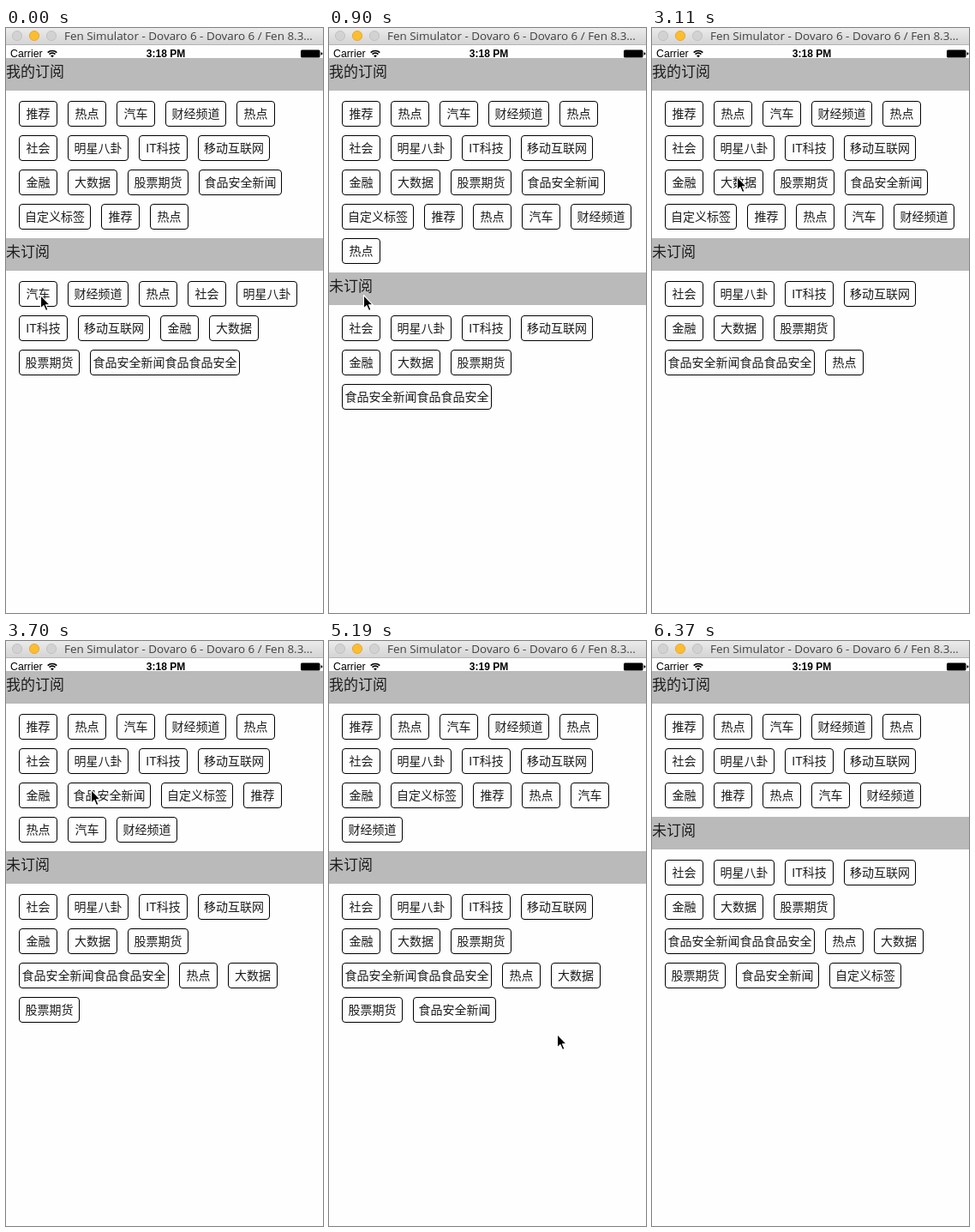
An HTML page that plays this animation: 370x682 px, repeating every 7250 ms.

```html
<!DOCTYPE html>
<html lang="zh-CN">
<head>
<meta charset="utf-8">
<title>订阅</title>
<style>
  html, body { margin: 0; width: 100%; height: 100%; overflow: hidden; background: #fefefe; }
  body { position: relative; color: #000; font-family: "Liberation Sans", "Noto Sans CJK SC", "Noto Sans CJK", sans-serif; }
  #bar, #pointer { position: absolute; left: 0; top: 0; }
  #pointer { overflow: visible; }
  main { position: absolute; left: 0; top: 35px; width: 370px; color: #1c1c1c; font-weight: 300; }
  h2 { margin: 0; height: 38px; background: #bababa; font: 300 17px/30px "Noto Sans CJK SC", "Noto Sans CJK", sans-serif; }
  .tags { display: flex; flex-wrap: wrap; gap: 10px 12px; padding: 12px 15px 10px; }
  .tags span { box-sizing: border-box; height: 30px; border: 1px solid #000; border-radius: 4px;
    font-size: 14px; line-height: 28px; text-align: center; white-space: nowrap; }
</style>
</head>
<body>
<svg id="bar" width="370" height="36">
  <defs>
    <linearGradient id="chrome" x2="0" y2="1">
      <stop stop-color="#ebebeb"/><stop offset="1" stop-color="#d3d3d3"/>
    </linearGradient>
  </defs>
  <rect width="370" height="20" fill="url(#chrome)"/>
  <rect y="19" width="370" height="1" fill="#b5b5b5"/>
  <g stroke-width=".8">
    <circle cx="13" cy="9" r="5.6" fill="#d2d2d2" stroke="#bcbcbc"/>
    <circle cx="33" cy="9" r="5.6" fill="#fdbd2f" stroke="#e0a029"/>
    <circle cx="53" cy="9" r="5.6" fill="#d2d2d2" stroke="#bcbcbc"/>
  </g>
  <text x="68" y="13.5" font-family="Open Sans, sans-serif" font-size="13.45" fill="#404040">Fen Simulator - Dovaro 6 - Dovaro 6 / Fen 8.3…</text>
  <text x="5" y="34" font-size="12.3">Carrier</text>
  <g fill="none" stroke="#000" stroke-width="1.7">
    <path d="M48.7 28.7a7.5 7.5 0 0 1 10.6 0M50.6 30.6a4.8 4.8 0 0 1 6.8 0"/>
    <path d="M54 34.3l-1.9-1.9a2.7 2.7 0 0 1 3.8 0z" fill="#000" stroke="none"/>
  </g>
  <text id="clock" x="186.5" y="34" font-size="12" font-weight="bold" text-anchor="middle"></text>
  <rect x="344" y="25.5" width="22.5" height="9" rx="1.5"/>
  <path d="M367.5 28.3q2 .3 2 1.7t-2 1.7z"/>
</svg>
<main>
  <h2>我的订阅</h2><div class="tags" id="mine"></div>
  <h2>未订阅</h2><div class="tags" id="others"></div>
</main>
<svg id="pointer" width="14" height="21">
  <path d="M.5 .5V16L4 12.7L6.6 18.6L9 17.5L6.5 11.8H11.3Z" stroke="#fff" stroke-width="1.1" stroke-linejoin="round"/>
</svg>
<script>
const $ = id => document.getElementById(id);
const LOOP = 7250, STEP = 147;
const base = '社会 明星八卦 IT科技 移动互联网 金融 大数据 股票期货';
const mineTags = `推荐 热点 汽车 财经频道 热点 ${base} 食品安全新闻 自定义标签 推荐 热点`.split(' ');
const otherTags = `汽车 财经频道 热点 ${base} 食品安全新闻食品食品安全`.split(' ');

const addTimes = [300, 600, 900];           // take the first of the others
const dropTimes = [3410, 3700, 4150, 6070]; // take the tag under the pointer
const dropLast = 2520, underPointer = 10;

// Curved pointer moves: start time, steps, bend point, end point
const home = [40, 311];
const moves = [
  { at: 1340, steps: 7, bend: [101, 411], to: [42, 266] },
  { at: 2520, steps: 5, bend: [84, 165], to: [99, 173] },
  { at: 4600, steps: 2, bend: [205, 365], to: [312, 558] },
  { at: 5040, steps: 7, bend: [190, 290], to: [118, 183] },
  { at: 6220, steps: 1, bend: [200, 320], to: [297, 457] }
];
const pointerGone = 6370;

const passed = (times, t) => times.filter(x => x <= t);
const ease = u => u * u * (3 - 2 * u);

function pointerAt(t) {
  let from = home;
  for (const { at, steps, bend, to } of moves) {
    if (t < at) break;
    const u = ease(Math.min(1, (Math.floor((t - at) / STEP) + 1) / steps));
    from = from.map((a, i) => (1 - u) ** 2 * a + 2 * u * (1 - u) * bend[i] + u * u * to[i]);
  }
  return from.map(Math.round);
}

// Latin letters are a little under half as wide as a Chinese character
const tagWidth = s => Math.round(19 + 13 * [...s].reduce((n, c) => n + (c < '~' ? .46 : 1), 0));

function fill(id, tags) {
  $(id).replaceChildren(...tags.map(s => {
    const el = document.createElement('span');
    el.textContent = s;
    el.style.width = tagWidth(s) + 'px';
    return el;
  }));
}

function showTags(t) {
  const mine = [...mineTags], others = [...otherTags];
  passed(addTimes, t).forEach(() => mine.push(others.shift()));
  if (t >= dropLast) others.push(mine.pop());
  passed(dropTimes, t).forEach(() => others.push(...mine.splice(underPointer, 1)));
  fill('mine', mine);
  fill('others', others);
}

const clicks = [...addTimes, dropLast, ...dropTimes];
let shown = -1;
function draw(t) {
  const count = passed(clicks, t).length;
  if (count !== shown) {
    shown = count;
    showTags(t);
  }
  $('clock').textContent = t < 4300 ? '3:18 PM' : '3:19 PM';
  const [x, y] = pointerAt(t);
  $('pointer').style.transform = `translate(${x}px, ${y}px)`;
  $('pointer').style.visibility = t < pointerGone ? 'visible' : 'hidden';
}

const start = performance.now();
function tick() {
  draw((performance.now() - start) % LOOP);
  requestAnimationFrame(tick);
}
tick();
</script>
</body>
</html>
```
